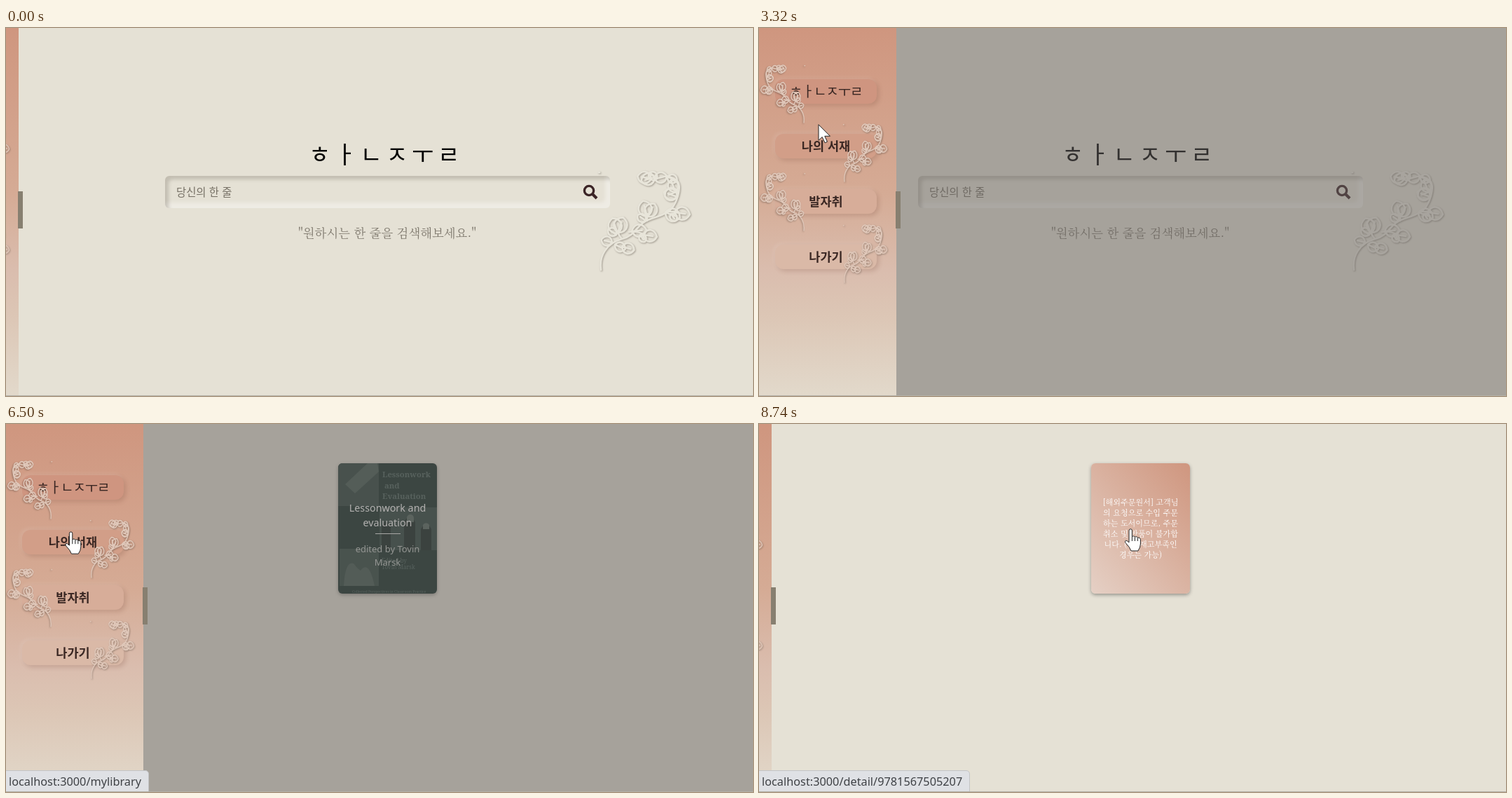
These frames come from a looping animation (1066 by 525 pixels, 9.48 s). An HTML page:

```html
<!DOCTYPE html>
<html lang="ko">
<head>
<meta charset="utf-8">
<style>
  html, body { margin: 0; width: 100%; height: 100%; overflow: hidden; background: #e5e1d5 }
  #stage { position: absolute; width: 1066px; height: 525px; overflow: hidden; font-family: "Noto Sans CJK KR", "Noto Sans", sans-serif }
  #stage div, #stage svg { position: absolute; white-space: nowrap; box-sizing: border-box }
  .fill { inset: 0 }
  .serif { font-family: "Noto Serif CJK KR", "Noto Sans CJK KR", serif }
  .branch { overflow: visible; fill: none; stroke-linecap: round; stroke-linejoin: round; filter: drop-shadow(1px 1.5px 1px rgba(70,60,50,.42)) }

  #title { left: 432px; top: 158px; font: 500 34px/42px "Noto Sans CJK KR", sans-serif; letter-spacing: 5.5px; color: #000 }
  #bar { left: 227px; top: 211px; width: 635px; height: 46px; border-radius: 6px;
    box-shadow: inset 5px 5px 5px rgba(80,72,60,.23), inset -7px -8px 5px rgba(255,255,255,.36) }
  #hint { left: 243px; top: 221px; font-size: 15.4px; line-height: 24px; font-weight: 300; color: #777166 }
  #ask { left: 417px; top: 278px; font-size: 17.4px; line-height: 28px; color: #7f796e }
  #caret { left: 671px; top: 280px; width: 1px; height: 24px; background: #333 }
  #shade { background: rgb(103,99,97) }

  #side { left: 0; top: 0; width: 196px; height: 525px;
    background: linear-gradient(#cf967f, #d5ab95 45%, #dabdae 66%, #dcc6b5 78%, #e2d9cb) }
  #handle { left: 195px; top: 233px; width: 7px; height: 53px; background: #877f70 }
  .btn { left: 23px; width: 145px; height: 35px; border-radius: 12px; text-align: center;
    font-weight: 700; font-size: 17.5px; line-height: 33px; color: #3a2723;
    box-shadow: 3px 3px 6px rgba(110,60,45,.2), -2px -2px 6px rgba(255,255,255,.13) }

  #book { left: 474px; top: 56px; width: 141px; height: 186px; perspective: 694px }
  .face { inset: 0; transform-style: preserve-3d }
  .face > div { inset: 0; backface-visibility: hidden; text-align: center }
  .bg { border-radius: 6px; overflow: hidden; box-shadow: 0 2px 5px rgba(0,0,0,.35) }
  .inner { transform: translateZ(42px) scale(.94); color: #fff; font-family: "Noto Sans", sans-serif }
  .inner div { width: 100% }
  #front .bg { background: #122b25; color: #49605a; font-family: "Noto Serif", serif; text-align: left }
  #back .bg { background: linear-gradient(50deg, #e5d0c5, #d9b09e 55%, #cf967f) }
  #status { left: -1px; top: 494px; height: 32px; padding: 0 10px 0 4px; border: 1px solid #c3c4c6; border-radius: 0 5px 0 0;
    background: #dfe1e5; color: #3f4246; font: 16.3px/31px "Noto Sans", sans-serif }
  #edge { left: 0; top: 524px; width: 1066px; height: 1px; background: #b3b0a7 }
  .cursor { left: 0; top: 0; overflow: visible; fill: #fff; stroke: #222; stroke-linejoin: round }
</style>
</head>
<body>
<div id="stage">
  <div id="home" class="fill">
    <div id="title">ㅎㅏㄴㅈㅜㄹ</div>
    <div id="bar"></div>
    <div id="hint">당신의 한 줄</div>
    <svg style="left:822px;top:222px" width="24" height="24" fill="none" stroke="#3b2426" stroke-width="3.4">
      <circle cx="10" cy="10" r="6.6"/><path d="M14.5 14.5L21 21" stroke-width="4"/></svg>
    <div id="ask" class="serif">"원하시는 한 줄을 검색해보세요."</div>
    <div id="caret"></div>
  </div>
  <div id="book">
    <div id="front" class="face">
      <div class="bg">
        <svg width="141" height="186">
          <path fill="#2a413b" d="M0 0H58V61H0Z"/><path fill="#435850" d="M10 30L42 0H56L58 12L24 43Z"/>
          <path fill="#29403a" d="M59 63H141V124H59Z"/>
          <path fill="#11221e" d="M62 124V90q6-14 13 0v34ZM94 124V84q8-16 16 0v40ZM118 124V94q8-14 15 0v30Z"/>
          <path fill="#50645d" d="M98 78a5 5 0 0 1 10 0v6h-10ZM121 88a5 5 0 0 1 9 0v6h-9Z"/>
          <path fill="#2d443d" d="M2 122H58V175H2Z"/><path fill="#40564e" d="M8 175q2-36 14-32q6 8 10 10q12-16 20 22Z"/>
        </svg>
        <div style="left:63px;top:8px;font:700 11.3px/15.5px 'Noto Serif',serif">Lessonwork<br>&nbsp;and<br>Evaluation</div>
        <div style="left:62px;top:134px;font-size:8px;line-height:9px">Edited by<br>Tovin Marsk</div>
        <div style="left:20px;top:180px;font-size:5px;line-height:6px">Collected Perspectives in Classroom Practice</div>
      </div>
      <div class="inner">
        <div style="top:54px;font-size:14.3px;line-height:20.5px">Lessonwork and<br>evaluation</div>
        <div style="left:53px;top:100px;width:36px;height:1px;background:#e8ecea"></div>
        <div style="top:113px;font-size:13px;line-height:18.5px;color:#c3cac6">edited by Tovin<br>Marsk</div>
      </div>
    </div>
    <div id="back" class="face">
      <div class="bg"></div>
      <div class="inner"><div class="serif" style="top:48px;font-size:11.1px;line-height:15px">[해외주문원서] 고객님<br>의 요청으로 수입 주문<br>하는 도서이므로, 주문<br>취소 및 반품이 불가합<br>니다. (단, 재고부족인<br>경우는 가능)</div></div>
    </div>
  </div>
  <div id="shade" class="fill"></div>
  <div id="side">
    <div id="handle"></div>
    <div id="menu">
      <div class="btn" style="top:73px;background:#cf9580;font-size:20px;font-weight:500;letter-spacing:-1.1px">ㅎㅏㄴㅈㅜㄹ</div>
      <div class="btn" style="top:151px;background:#d29e88">나의 서재</div>
      <div class="btn" style="top:230px;background:#d7ad99">발자취</div>
      <div class="btn" style="top:309px;background:#dab9a7">나가기</div>
    </div>
  </div>
  <div id="status"></div>
  <div id="edge"></div>
  <svg id="arrow" class="cursor" width="20" height="28"><path d="M0 .5V23L5.200 18.200L9.100 26.500L12.500 25L8.800 17H16.500Z"/></svg>
  <svg id="hand" class="cursor" width="26" height="34"><path d="M7 3a2.2 2.2 0 0 1 4.4 0V11.5q2.4-1.8 4 .6q2.6-1.4 4 1q3.2-.8 4 2.2V22q0 5-3.5 10H10q-1.5-5-8-11.5q-1.5-4 2-3L7 20ZM11.4 11.5V18M15.4 12.5V18M19.4 13.5V18"/></svg>
</div>
<script>
const $ = id => document.getElementById(id);
const LOOP = 9480, PAGE_SWITCH = 6060;

// Each leaf: base x, base y, direction in degrees, length
const LEAVES = [
  [20,103,195,16], [24,106,25,16], [34,109,15,18], [28,90,250,23], [28,89,290,23], [26,92,215,14],
  [48,87,-5,21], [64,92,8,20], [60,92,55,12], [70,66,255,23], [70,66,300,21], [68,72,215,14],
  [96,60,20,22], [109,60,8,22], [104,62,55,12], [113,38,200,20], [114,30,160,20],
  [98,8,165,18], [81,10,165,20], [76,12,190,20], [99,9,25,15], [104,14,70,18], [84,12,215,14]
];
const leaf = ([x, y, a, l]) => `<path transform="translate(${x} ${y})rotate(${a})" d="M0 0C${l*.25} ${-l*.6} ${l*.8} ${-l*.5} ${l} 0C${l*.8} ${l*.5} ${l*.25} ${l*.6} 0 0H${l*.7}"/>`;

function branch(parent, x, y, w, h, color, width, flip) {
  parent.insertAdjacentHTML('beforeend', `<svg class="branch" viewBox="0 0 134 144" preserveAspectRatio="none"
    style="left:${x}px;top:${y}px;width:${w}px;height:${h}px;stroke:${color};stroke-width:${width};${flip ? 'transform:scaleX(-1)' : ''}">
    <path d="M4 142C1 122 12 104 34 98S54 76 76 69S108 58 114 36S110 12 98 8M34 98Q30 94 28 88M44 88Q56 86 66 92M70 72V62M98 59H113M1 3h1"/>
    ${LEAVES.map(leaf).join('')}</svg>`);
}
branch($('home'), 845, 203, 134, 144, '#e8e5da', 2.7);
for (const y of [52, 206]) branch($('side'), 1, y, 65, 84, '#e0c8ba', 2.8, true);
for (const y of [136, 280]) branch($('side'), 120, y, 64, 84, '#e0c8ba', 2.8);

// Cursor route: time, x, y
const ROUTE = [
  [60,300,485], [550,90,330], [990,2,163], [1450,10,179], [2130,10,179], [2850,50,99], [3060,63,104],
  [3320,85,137], [4050,76,340], [4400,84,352], [4970,88,255], [5050,88,255], [5420,90,221], [5950,92,154],
  [6500,92,154], [6720,180,190], [6950,312,207], [7200,430,190], [7370,502,160], [7450,530,150], [LOOP,530,150]
];

const clamp = v => Math.min(1, Math.max(0, v));
const ramp = (t, a, b) => clamp((t - a) / (b - a));

function bezier(x1, y1, x2, y2) {
  const at = (s, a, b) => 3*s*(1-s)*(1-s)*a + 3*s*s*(1-s)*b + s*s*s;
  return x => {
    let lo = 0, hi = 1;
    for (let i = 0; i < 20; i++) {
      const mid = (lo + hi) / 2;
      if (at(mid, x1, x2) < x) lo = mid; else hi = mid;
    }
    return at(hi, y1, y2);
  };
}
const ease = bezier(.25, .1, .25, 1), flip = bezier(.4, .2, .2, 1);
const pulse = (t, a, b, c, d) => ease(ramp(t, a, b)) - ease(ramp(t, c, d));

function cursorAt(t) {
  const i = Math.max(1, ROUTE.findIndex(p => p[0] > t));
  const [a, x, y] = ROUTE[i - 1], [b, u, v] = ROUTE[i], k = ramp(t, a, b);
  return [x + (u - x) * k, y + (v - y) * k];
}

function isLink(t, x, y) {
  if (t > 6900) return x > 474 && x < 615 && y > 56 && y < 242;
  return t > 1450 && x > 23 && x < 168 && [73, 151, 230, 309].some(top => y > top && y < top + 35);
}

function status(t) {
  if (t < 5650) return ['history', t > 5080 ? 1 : 0];
  if (t < 7200) return ['mylibrary', t > 5760 ? 1 - ramp(t, 6880, 6980) : 0];
  return ['detail/9781567505207', ramp(t, 7720, 7900)];
}

function draw(t) {
  const home = t < PAGE_SWITCH;
  $('home').style.display = home ? '' : 'none';
  $('book').style.display = home ? 'none' : '';
  const blink = t % 1000;
  $('caret').style.opacity = ramp(blink, 405, 440) * (blink < 825);

  $('shade').style.opacity = .5 * pulse(t, 1020, 1450, 6780, 6940);
  $('side').style.transform = `translateX(${178 * (pulse(t, 1020, 1480, 6922, 7422) - 1)}px)`;
  $('menu').style.transform = `translateX(${170 * (pulse(t, 1020, 1450, 6881, 7381) - 1)}px)`;

  const turn = 180 * flip(ramp(t, 7366, 8066));
  $('front').style.transform = `rotateY(${-turn}deg)`;
  $('back').style.transform = `rotateY(${180 - turn}deg)`;

  const [path, alpha] = status(t);
  $('status').textContent = 'localhost:3000/' + path;
  $('status').style.opacity = alpha;

  const [x, y] = cursorAt(t), link = isLink(t, x, y);
  $('arrow').style.display = t >= 60 && !link ? '' : 'none';
  $('hand').style.display = link ? '' : 'none';
  $('arrow').style.transform = `translate(${x}px,${y}px)`;
  $('hand').style.transform = `translate(${x - 9}px,${y - 1}px)`;
}

const start = performance.now();
function tick() {
  draw((performance.now() - start) % LOOP);
  requestAnimationFrame(tick);
}
tick();
</script>
</body>
</html>
```
